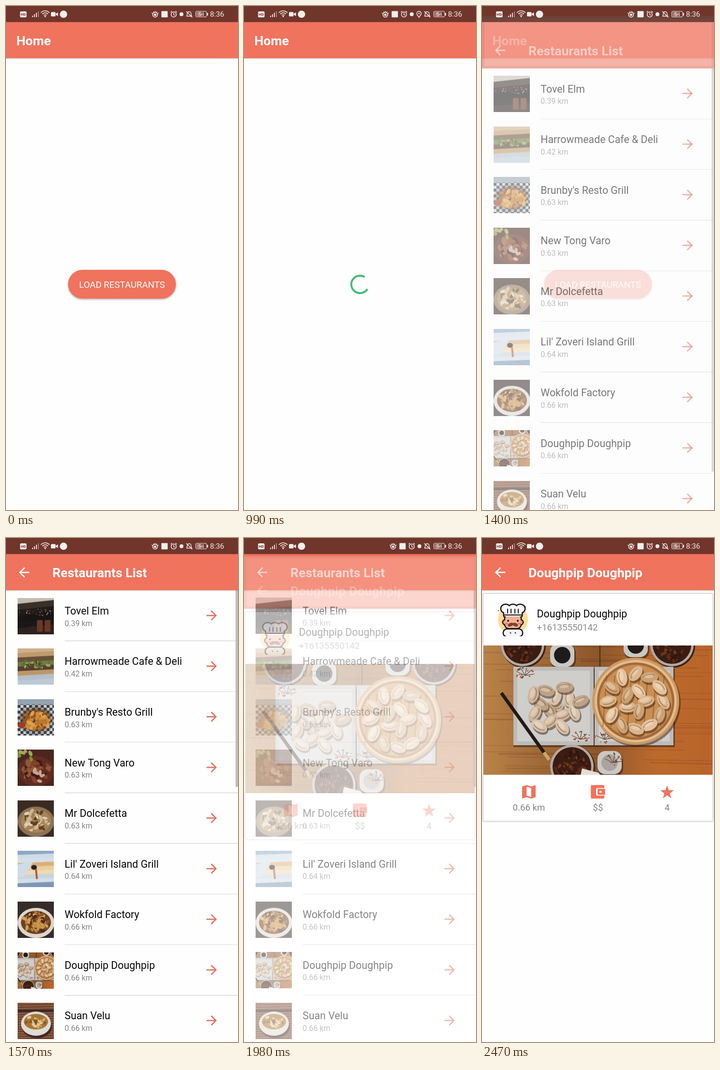
Animation of 480x1041 px, one loop 2.59 s. Source, as an HTML page with a canvas:

```html
<!DOCTYPE html>
<html lang="en">
<head>
<meta charset="utf-8">
<title>Restaurants</title>
<style>
html, body { margin: 0; width: 100%; height: 100%; overflow: hidden; background: #fefefe; }
canvas { display: block; width: 100vw; height: 100vh; }
</style>
</head>
<body>
<canvas id="stage" width="480" height="1041"></canvas>
<script>
const LOOP = 2590, LOAD_AT = 570, LIST_AT = 1316, DETAIL_AT = 1930, SLIDE = 350;
const CORAL = '#f0735d', PAPER = '#fefefe', PITCH = 104.57, TAU = Math.PI * 2;
const ROWS = [
  ['Tovel Elm', '0.39 km'], ['Harrowmeade Cafe & Deli', '0.42 km'], ["Brunby's Resto Grill", '0.63 km'],
  ['New Tong Varo', '0.63 km'], ['Mr Dolcefetta', '0.63 km'], ["Lil' Zoveri Island Grill", '0.64 km'],
  ['Wokfold Factory', '0.66 km'], ['Doughpip Doughpip', '0.66 km'], ['Suan Velu', '0.66 km']
];
const PICKED = ROWS[7];

const main = document.getElementById('stage').getContext('2d');
let g = main;

// Drawing helpers
const clamp = v => Math.min(1, Math.max(0, v));

function box(c, x, y, w, h, r = 0) {
  g.fillStyle = c;
  g.beginPath();
  g.roundRect(x, y, w, h, r);
  g.fill();
}
function frame(c, lw, x, y, w, h, r = 0) {
  g.strokeStyle = c;
  g.lineWidth = lw;
  g.beginPath();
  g.roundRect(x, y, w, h, r);
  g.stroke();
}
function oval(c, x, y, rx, ry = rx, rot = 0) {
  g.fillStyle = c;
  g.beginPath();
  g.ellipse(x, y, rx, ry, rot, 0, TAU);
  g.fill();
}
function ring(c, lw, x, y, r, from = 0, to = TAU) {
  g.strokeStyle = c;
  g.lineWidth = lw;
  g.beginPath();
  g.arc(x, y, r, from, to);
  g.stroke();
}
function trace(p) {
  g.beginPath();
  for (let i = 0; i < p.length; i += 2) g.lineTo(p[i], p[i + 1]);
}
function line(c, lw, ...p) {
  g.strokeStyle = c;
  g.lineWidth = lw;
  trace(p);
  g.stroke();
}
function poly(c, ...p) {
  g.fillStyle = c;
  trace(p);
  g.fill();
}
function text(s, x, y, size, c, weight = 400, align = 'left') {
  g.font = `${weight} ${size}px Roboto, sans-serif`;
  g.textAlign = align;
  g.fillStyle = c;
  g.fillText(s, x, y);
}
function arrow(c, x, y, dir) {
  const tip = x + dir * 8.8;
  line(c, 2.67, x - dir * 10.67, y, tip, y);
  line(c, 2.67, x - dir * .94, y - 9.72, tip, y, x - dir * .94, y + 9.72);
}
function random(seed) {
  seed *= 7919;
  return () => (seed = seed * 16807 % 2147483647) / 2147483647;
}
function scatter(seed, n, colors, x, y, rx, ry, size) {
  const rnd = random(seed);
  for (let i = 0; i < n; i++) {
    const a = rnd() * TAU, d = Math.sqrt(rnd()), s = size * (.6 + rnd() * .7);
    oval(colors[i % colors.length], x + Math.cos(a) * d * rx, y + Math.sin(a) * d * ry, s, s * .6, rnd() * 3);
  }
}
function sprite(w, h, paint) {
  const c = document.createElement('canvas');
  c.width = w;
  c.height = h;
  g = c.getContext('2d');
  paint();
  g = main;
  return c;
}

// Dumpling picture
function dumpling(x, y, rot, tone) {
  oval('rgba(60,30,10,.5)', x + 2, y + 4, 18, 12, rot);
  oval(tone, x, y, 18, 11, rot);
  oval('rgba(255,240,220,.35)', x - 2, y - 3, 11, 5, rot);
  g.strokeStyle = 'rgba(110,70,40,.45)';
  g.lineWidth = 2;
  g.beginPath();
  g.ellipse(x, y, 13, 6, rot, 0, 2.6);
  g.stroke();
}
function bowl(x, y) {
  oval('#3c2316', x + 2, y + 2, 46);
  oval('#b3aaa0', x, y, 45);
  oval('#3a1c12', x, y, 40);
  scatter(x, 60, ['#5a2a17', '#6e3820', '#2b140e'], x, y, 34, 34, 4);
}
function dish(x, y, sauce) {
  box('rgba(40,20,10,.5)', x - 24, y - 21, 52, 49, 16);
  box('#c9c8c4', x - 25, y - 24, 50, 48, 16);
  oval(sauce, x, y, 17);
}
function plate(x, y, w, h) {
  box('rgba(45,25,10,.5)', x, y + 4, w + 3, h);
  box('#bdbcba', x, y, w, h);
  box('#cfceca', x + 8, y + 8, w - 16, h - 16);
}
function blossom(x, y) {
  for (let a = .2; a < 3; a += .6) line('#6b4a3e', 1.3, x, y, x + Math.cos(a) * 20, y - Math.sin(a) * 16);
  scatter(x, 12, ['#b0623e', '#6d4438'], x, y - 6, 20, 13, 2.5);
}
const photo = sprite(474, 267, () => {
  const wood = g.createLinearGradient(0, 0, 474, 0);
  ['#b98249', '#a06a38', '#8c572c', '#bb6a2c', '#b9642a'].forEach((c, i) => wood.addColorStop(i / 4, c));
  box(wood, 0, 0, 474, 267);
  const rnd = random(9);
  for (let y = 2; y < 267; y += 6) {
    const x = rnd() * 500 - 120;
    line(`rgba(70,30,5,${.08 + rnd() * .12})`, 1 + rnd() * 2, x, y, x + 220, y + rnd() * 5);
  }
  line('#4a2a14', 2, 241, 0, 241, 45);
  for (const x of [81, 390]) bowl(x, -2);
  dish(163, 20, '#201b1b');
  dish(315, 0, '#241b19');
  plate(62, 44, 166, 162);
  plate(230, 44, 163, 162);
  blossom(86, 62);
  blossom(200, 194);
  blossom(250, 194);

  const tones = ['#cdb59b', '#bda288', '#d6c2ab'];
  for (let i = 0; i < 15; i++) {
    const r = 15 * Math.sqrt(i), a = i * 2.4;
    dumpling(148 + Math.cos(a) * r, 125 + Math.sin(a) * r * .9, a * 1.7, tones[i % 3]);
  }

  oval('rgba(50,25,8,.5)', 318, 119, 90);
  ['#c99a66', '#e3bd8c', '#a4693a', '#c98e52'].forEach((c, i) => oval(c, 315, 115, 90 - i * 5));
  for (let x = 255; x < 380; x += 17) line('rgba(120,70,25,.5)', 2, x, 62, x - 8, 168);
  const warm = ['#dbb58c', '#cba173', '#e2c39d'];
  for (let i = 0; i < 17; i++) {
    const outer = i < 12, a = outer ? i * TAU / 12 : i * TAU / 5, r = outer ? 57 : 21;
    dumpling(315 + Math.cos(a) * r, 115 + Math.sin(a) * r, a * 1.6 + 1, warm[i % 3]);
  }

  line('#231a18', 7, 37, 98, 126, 222);
  line('#caa56d', 7, 125, 221, 136, 236);
  bowl(183, 250);
  poly('#e4ded6', 204, 254, 238, 263, 241, 267, 201, 267);
  dish(261, 242, '#a9a49d');
  blossom(268, 242);
});

// Thumbnails: layered strips, or a heap of food on a plate
function strips(colors, slant) {
  const h = 75 / colors.length;
  colors.forEach((c, i) => poly(c, 0, i * h, 75, i * h - slant, 75, 90, 0, 90));
}
function heap(seed, bg, dish, base, colors, size) {
  box(bg, 0, 0, 75, 75);
  oval(dish, 38, 44, 38, 31);
  oval(base, 38, 43, 31, 24);
  scatter(seed, 60, colors, 38, 42, 28, 21, size);
}
const PAINTERS = [
  () => {
    strips(['#c3bcb0', '#3a302a', '#211b19', '#181414', '#1b1716', '#2c2220'], 8);
    scatter(3, 30, ['#8c7a69', '#6c4632', '#b5a48f'], 38, 30, 36, 7, 1.4);
    for (const x of [40, 56]) box('#6a3825', x, 46, 12, 24, 2);
  },
  () => {
    strips(['#cdb08a', '#c09a6c', '#6a4f3a', '#6f7d42', '#55402f', '#bd9765', '#b3bfca', '#bccad6'], 4);
    scatter(4, 30, ['#91a957', '#55762f', '#653b2c'], 36, 32, 36, 8, 4);
  },
  () => {
    heap(6, '#d0d3d6', '#a8a9ab', '#aa6525', [], 0);
    for (let i = 0; i < 169; i += 2) box('#3d3f43', i % 13 * 6, Math.floor(i / 13) * 6, 6, 6);
    box('#93a3b0', 0, 0, 75, 11);
    scatter(6, 55, ['#d08c38', '#b8742a', '#dda24c', '#925520'], 39, 45, 27, 17, 6);
    oval('#a43720', 8, 54, 8, 6);
  },
  () => {
    heap(8, '#4a261c', '#5d2e20', '#5d2e20', ['#86402a', '#652a1d', '#3a1c15', '#8f5638'], 7);
    scatter(9, 8, ['#799139', '#a3a65e'], 19, 13, 19, 10, 5);
    scatter(12, 6, ['#c4a690'], 36, 54, 22, 12, 6);
  },
  () => heap(11, '#3a2b22', '#8d7259', '#a98556', ['#cdb790', '#a37f50', '#ded0b4', '#5f4028'], 5),
  () => {
    strips(['#8fa8c2', '#cfdce7', '#d5dfe8', '#dcae74', '#e8cfa2', '#eedab4', '#c8d5e0', '#d3dee8', '#7d97b3'], 3);
    poly('#cfdce7', 0, 28, 34, 20, 12, 54, 0, 54);
    oval('#24222d', 34, 34, 6, 5);
    line('#b45a38', 4, 38, 38, 40, 58);
  },
  () => {
    heap(14, '#352c2a', '#ddd6cc', '#6d3f20', ['#b9823c', '#8d5a28', '#d0a055', '#4d2a20'], 5);
    const rnd = random(7);
    for (let i = 0; i < 16; i++) ring('#cf9a4e', 1.6, 22 + rnd() * 32, 32 + rnd() * 22, 7, i, i + 2.5);
  },
  () => g.drawImage(photo, 103.5, 0, 267, 267, 0, 0, 75, 75),
  () => {
    heap(15, '#6e4230', '#6e4230', '#6e4230', [], 0);
    for (let y = 2; y < 75; y += 5) line('#9a6c4d', 1.5, 0, y, 75, y - 2);
    box('#3b2924', 0, 14, 75, 5);
    oval('#402820', 40, 49, 31, 24);
    oval('#dedbd5', 38, 43, 31, 25);
    oval('#a77635', 38, 39, 25, 16);
    scatter(15, 24, ['#d3ae68', '#855321', '#e2cb98'], 38, 39, 21, 12, 4);
  }
];
const thumbs = PAINTERS.map(p => sprite(75, 75, p));

const chef = sprite(70, 70, () => {
  const ink = '#171418';
  g.translate(34, 0);
  g.lineCap = 'round';
  oval('#fedc98', 0, 35, 31);
  for (const [x, y] of [[-30, 17], [26, 9], [-24, 11]]) oval('#dd7650', x, y, 1.6);
  // Ink pass, then a slightly smaller colour pass
  for (const e of [2.5, 0]) {
    const part = (c, x, y, w, h, r) => box(e ? ink : c, x - e, y - e, w + 2 * e, h + 2 * e, r + e);
    part('#f4f3f7', -19, 56, 38, 14, 7);
    part('#ee9b80', -20, 37, 40, 8, 4);
    part('#f6b095', -16, 26, 32, 27, 8);
    part('#f8f7fc', -18, 14, 36, 15, 2);
    for (const x of [-15, 0, 15]) oval(e ? ink : '#f8f7fc', x, 13, 9 + e, 8 + e);
  }
  line(ink, 2, -18, 26, 18, 26);
  for (const x of [-11, -4, 4, 11]) line(ink, 2, x, 14, x, 22);
  for (const s of [-1, 1]) {
    oval(ink, s * 10, 38, 2);
    oval('#e97d70', s * 13, 44, 3, 2);
    oval('#7d412c', s * 5, 46, 6, 3.6, s * .4);
    oval(ink, s * 5, 63, 1.3);
  }
});

// Status bar
function statusBar(locating) {
  const W = '#f4eeec';
  box('rgba(0,0,0,.535)', 0, 0, 480, 33.3);
  box(W, 29, 11, 13.5, 12.5, 2.5);
  text('HD', 35.8, 20.3, 8, '#6f352b', 700, 'center');
  for (let i = 0; i < 4; i++) box(i < 3 ? W : 'rgba(244,238,236,.45)', 54 + i * 4, 20 - i * 3, 1.8, 3 + i * 3);
  for (let r = 4; r < 13; r += 4) ring(W, 1.7, 81, 22, r, -2.4, -.74);
  oval(W, 81, 21.5, 1.6);
  box(W, 93, 12.5, 9.5, 9, 1.5);
  poly(W, 103, 16, 107.5, 13, 107.5, 21, 103, 18);
  oval(W, 119, 17, 7.6);

  g.save();
  if (locating) g.translate(-16, 0);
  ring(W, 1.6, 308.5, 18, 5);
  oval(W, 308.5, 18, 2.6);
  for (let k = -2; k <= 2; k++) line(W, 1.4, 308.5 + k * 2.6, 13 + k * k * .6, 308.5 + k * 3.6, 10.5 + k * k);
  box(W, 321.5, 10.5, 13, 13, 1);
  ring(W, 1.5, 347, 17.5, 5.3);
  line(W, 1.4, 347, 14, 347, 18, 349.5, 19);
  for (const s of [-1, 1]) line(W, 1.6, 347 + s * 6.5, 13, 347 + s * 3.5, 10.5);
  oval(W, 363, 17, 4);
  g.restore();

  if (locating) {
    ring(W, 1.5, 362, 15.5, 4.6, 2.6, 6.85);
    line(W, 1.5, 358, 17.8, 362, 23.5, 366, 17.8);
    oval(W, 362, 15.5, 1.4);
  }
  ring(W, 1.4, 379, 15.5, 3.8, Math.PI, TAU);
  line(W, 1.4, 375.2, 15.5, 374, 21, 384, 21, 382.8, 15.5);
  line(W, 1.5, 373, 11, 385.5, 23.5);
  frame(W, 1, 392.5, 11, 22.5, 11.5, 2);
  box('rgba(244,238,236,.4)', 394, 12.5, 11, 8.5);
  box(W, 416, 14, 2, 6, 1);
  text('54', 403.8, 20.8, 11, W, 400, 'center');
  text('8:36', 422, 22.3, 15.2, W);
}

// Screens
function header(title, x, back, moving) {
  box(CORAL, 0, 0, 480, 108);
  if (moving) frame('rgba(110,20,10,.12)', 5, 2.5, 2.5, 475, 103);
  for (let i = 0; i < 4; i++) box(`rgba(0,0,0,${.1 - i * .028})`, 0, 108 + i, 480, 1);
  if (back) arrow('#fff', 37.5, 71, -1);
  text(title, x, 81, 26.67, '#fff', 700);
}

// Eased arc end: cubic curve from (0, 0) to (.5, 1), solved for x
function trim(x) {
  x = Math.min(.5, Math.max(0, x));
  let lo = 0, hi = 1;
  for (let i = 0; i < 24; i++) {
    const u = (lo + hi) / 2, v = 1 - u;
    if (.6 * v * v * u + .3 * v * u * u + .5 * u ** 3 < x) lo = u; else hi = u;
  }
  return 3 * (1 - lo) * lo * lo + lo ** 3;
}
function spinner(t) {
  const x = (t - 500) / 1333, rad = TAU / 360;
  const turn = 38 + (t - 990) * .2295;
  g.save();
  g.lineCap = 'square';
  ring('#3fbc74', 4, 240, 575, 18, (turn + 270 * trim(x - .5)) * rad, (turn + 270 * trim(x)) * rad);
  g.restore();
}
function button() {
  g.save();
  g.shadowColor = 'rgba(0,0,0,.32)';
  g.shadowBlur = 4;
  g.shadowOffsetY = 1.6;
  box(CORAL, 128.5, 545, 223, 59.5, 29.7);
  g.restore();
  text('LOAD RESTAURANTS', 240, 581.8, 18.67, '#fff', 400, 'center');
}
function touch(x, y) {
  oval('rgba(255,255,255,.18)', x, y, 18.5);
  oval('rgba(255,255,255,.55)', x, y, 14);
  ring('rgba(218,214,234,.65)', 1.5, x, y, 15);
}

function home(t) {
  box(PAPER, 0, 0, 480, 1041);
  header('Home', 21.5, false);
  if (t >= LOAD_AT && t < LIST_AT) spinner(t);
  else button();
}

function list(t, moving) {
  box(PAPER, 0, 108, 480, 1041);
  ROWS.forEach(([name, distance], i) => {
    const y = i * PITCH;
    g.drawImage(thumbs[i], 24, 123.4 + y, 75, 75);
    text(name, 121.3, 157.8 + y, 21.33, '#060606');
    text(distance, 121.3, 181.4 + y, 16, '#858585');
    arrow('#df745f', 425.5, 160 + y, 1);
    box('#b5b5b5', 121.5, 212.2 + y, 358.5, .6);
  });
  box('#bdbdbd', 475, 108, 5, t < 1490 ? 833 : 406);
  header('Restaurants List', 96, true, moving);
}

const FACTS = [
  ['0.66 km', () => {
    poly(CORAL, -14, -11, -4.7, -14, 4.7, -11, 14, -14, 14, 11, 4.7, 14, -4.7, 11, -14, 14);
    poly('#fff', -4.7, -10.9, 4.7, -7.7, 4.7, 10.9, -4.7, 7.7);
  }],
  ['$$', () => {
    box(CORAL, -14.8, -14, 28, 28, 3);
    box('#fff', -3.9, -7.8, 19, 15.6, 3);
    box(CORAL, -.8, -6.2, 15.6, 12.4);
    oval('#fff', 5.4, 0, 2.3);
  }],
  ['4', () => {
    const p = [];
    for (let i = 0; i < 10; i++) {
      const r = i % 2 ? 6 : 14.7, a = i * TAU / 10;
      p.push(Math.sin(a) * r, 1.3 - Math.cos(a) * r);
    }
    poly(CORAL, ...p);
  }]
];

function detail(t, moving) {
  box(PAPER, 0, 108, 480, 1041);
  for (let i = 0; i < 4; i++) frame(`rgba(40,20,60,${.17 - i * .045})`, 1, 2.5 - i, 115 - i * .5, 475 + i * 2, 469.5 + i * 1.5, 2);
  box('#fff', 3, 115, 474, 469, 1.5);
  g.drawImage(chef, 30, 133);
  text(PICKED[0], 113.5, 164.3, 21.33, '#060606');
  text('+16135550142', 113.5, 190.8, 18.67, '#8b8b8b');
  g.drawImage(photo, 3, 222);
  FACTS.forEach(([label, icon], i) => {
    const x = 97 + i * 143;
    g.save();
    g.translate(x, 524.3);
    icon();
    g.restore();
    text(label, x, 563.2, 18.67, '#858585', 400, 'center');
  });
  header(PICKED[0], 96, true, moving);
}

// Rise and fade in over the screen below
function enter(screen, t, start) {
  const k = clamp((t - start) / SLIDE), p = 1 - (1 - k) ** 5;
  const alpha = p < .5 ? p / 2 : p < .9 ? .25 + (p - .5) * 1.125 : .7 + (p - .9) * 3;
  g.save();
  g.globalAlpha = alpha;
  g.translate(0, (1 - p) * 83.3);
  box(PAPER, 0, 0, 480, 1041);
  screen(t, alpha < .99);
  g.restore();
}

function draw(t) {
  if (t < LIST_AT + SLIDE) home(t);
  if (t >= LIST_AT) enter(list, t, LIST_AT);
  if (t >= DETAIL_AT) enter(detail, t, DETAIL_AT);
  if (t >= 420 && t < LOAD_AT) touch(174.5, 576.5);
  if (t >= 1910 && t < 1980) touch(362.5, 879.5);
  statusBar(t >= 740 && t < LIST_AT);
}

const origin = performance.now();
function tick() {
  draw((performance.now() - origin) % LOOP);
  requestAnimationFrame(tick);
}
tick();
</script>
</body>
</html>
```
